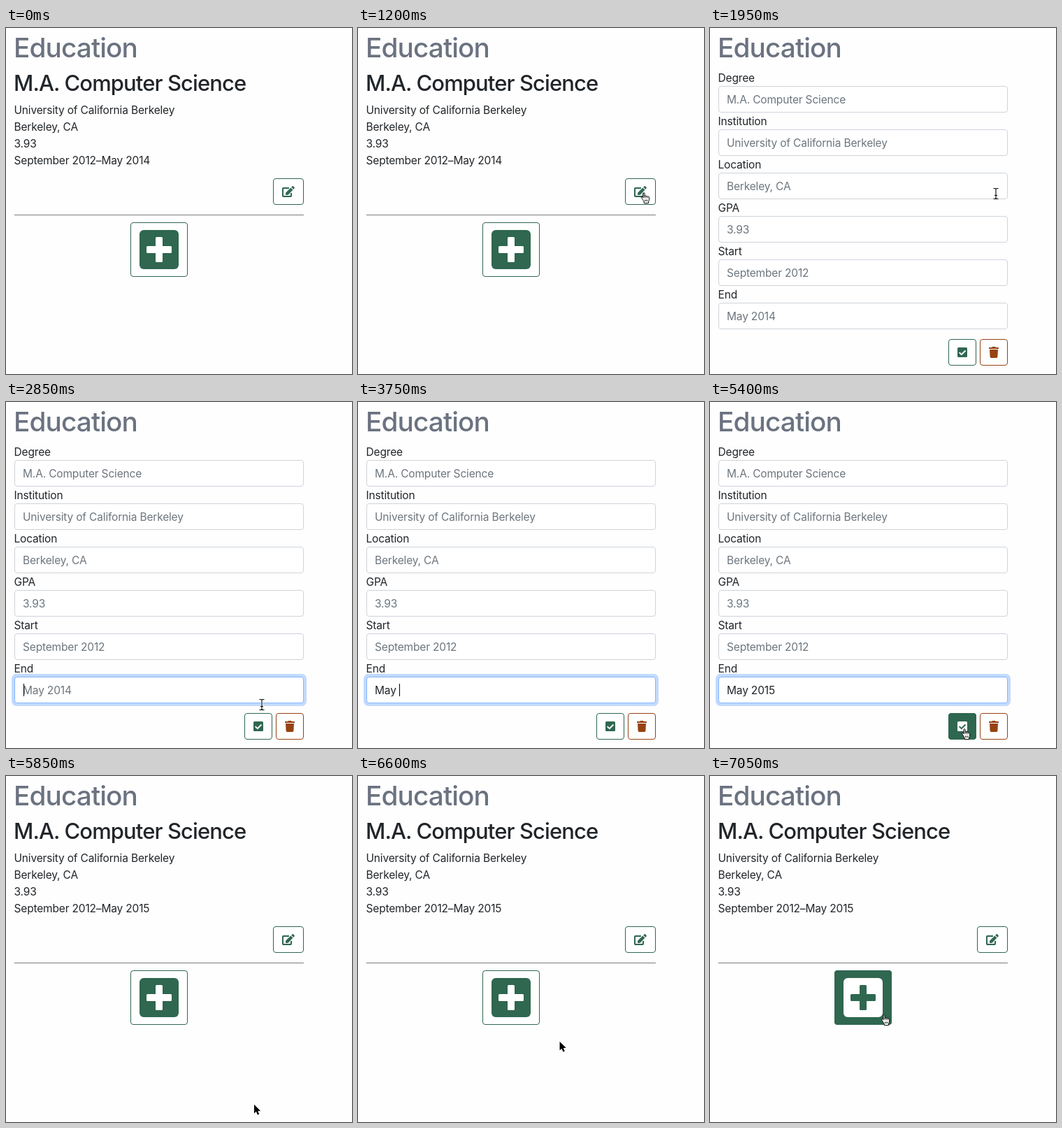
Animation of 495 by 495 pixels, one loop 8 s. Source, as an HTML page:

```html
<!DOCTYPE html>
<html lang="en">
<head>
<meta charset="utf-8">
<title>Education form</title>
<style>
html, body { margin: 0; width: 100%; height: 100%; overflow: hidden; background: #fefefe; }
svg { display: block; width: 495px; height: 495px; }
text { font: 400 15.5px Inter, "Open Sans", sans-serif; letter-spacing: -.17px; fill: #212529; font-optical-sizing: none; }
.h1 { font-size: 38.75px; font-weight: 500; letter-spacing: -.9px; fill: #6b7280; }
.h2 { font-size: 31px; font-weight: 500; letter-spacing: -.9px; }
.hint { fill: #6c757d; }
</style>
</head>
<body>
<svg id="stage" viewBox="0 0 495 495" xmlns="http://www.w3.org/2000/svg"></svg>
<script>
const LOOP = 8000, STEP = 150;
const GREEN = '#2f6750', BROWN = '#964312', WHITE = '#fff';

const label = (x, y, str, attrs = '') => `<text x="${x}" y="${y}" ${attrs}>${str}</text>`;
const box = (x, y, w, h, r, fill, stroke) =>
  `<rect x="${x + .5}" y="${y + .5}" width="${w - 1}" height="${h - 1}" rx="${r}" fill="${fill}" stroke="${stroke}"/>`;

// Each icon is drawn around its own top left corner.
const icons = {
  edit: fg => `<path d="M10 3H1.8Q1 3 1 3.8V14.2Q1 15 1.8 15H12.2Q13 15 13 14.2V10" fill="none" stroke="${fg}" stroke-width="2"/>
    <path d="M12.4 2.5 15.5 5.6 8.6 12.7 5.6 13Q5 13 5 12.4L5.3 9.4ZM13.2 1.7 14.4.4Q15.2-.2 16.1.4L17.6 1.9Q18.2 2.7 17.6 3.6L16.3 4.8Z" fill="${fg}"/>`,
  plus: (fg, bg) => `<rect width="56" height="56" rx="6" fill="${fg}"/>
    <rect x="10" y="23" width="36" height="10" rx="1.5" fill="${bg}"/>
    <rect x="23" y="10" width="10" height="36" rx="1.5" fill="${bg}"/>`,
  check: (fg, bg) => `<rect width="14" height="14" rx="1.5" fill="${fg}"/>
    <path d="M2.6 7.1 5.8 10.2 11.5 4.5" fill="none" stroke="${bg}" stroke-width="2"/>`,
  trash: fg => `<path d="M.5 1H4L4.7.3Q5 0 5.4 0H8.6Q9 0 9.3.3L10 1H13.5Q14 1 14 1.5V3H0V1.5Q0 1 .5 1ZM1 4H13L12.4 14.6Q12.3 16 10.9 16H3.1Q1.7 16 1.6 14.6Z" fill="${fg}"/>`
};

function button(name, x, y, w, h, iw, ih, color) {
  const at = `<g transform="translate(${x + (w - iw) / 2} ${y + (h - ih) / 2})">`;
  return box(x, y, w, h, 3.5, WHITE, color) + at + icons[name](color, WHITE) + '</g>' +
    `<g id="${name}Hot" opacity="0">` + box(x, y, w, h, 3.5, color, color) + at + icons[name](WHITE, color) + '</g></g>';
}

const fields = [
  ['Degree', 'M.A. Computer Science'],
  ['Institution', 'University of California Berkeley'],
  ['Location', 'Berkeley, CA'],
  ['GPA', '3.93'],
  ['Start', 'September 2012'],
  ['End', 'May 2014']
];

const form = fields.map(([name, hint], i) => {
  const y = 59 + 62 * i, last = i === fields.length - 1;
  const glow = `<g id="focus" opacity="0"><rect x="8" y="${y + 20}" width="422" height="46" rx="7" fill="#c2dafd"/>` +
    box(12, y + 24, 414, 38, 3.5, WHITE, '#86b7fe') + '</g>';
  return label(11.5, y + 18, name) + box(12, y + 24, 414, 38, 3.5, WHITE, '#ced4da') +
    (last ? glow : '') + label(24, y + 49, hint, `class="hint" ${last ? 'id="entry"' : ''}`);
}).join('');

const cursors = {
  arrow: `<path d="M0 0V12.7L2.9 10 4.9 14.8 7.2 13.8 5.2 9.2H9.2Z" fill="#000" stroke="#fff" stroke-width="1.6" paint-order="stroke"/>`,
  hand: `<g transform="translate(-4.3 -1)"><path d="M2.6 10.2 .9 8.1C0 6.9 1.3 5.9 2.3 6.8L3.3 7.8V1.7C3.3.3 5.4.3 5.4 1.7V5.7C5.6 4.6 7.5 4.7 7.6 5.9 7.9 5 9.6 5.2 9.7 6.4 10.1 5.7 11.9 5.9 11.9 7.4V10.2C11.9 12.4 10.7 13 10.7 15.7H4.7C4.6 13.2 3.4 11.9 2.6 10.2Z" fill="#fff" stroke="#000" stroke-linejoin="round"/>
    <path d="M5.4 5.5V8.3M7.6 6V8.3M9.7 6.5V8.3M5.8 10.5V13.2M7.6 10.5V13.2M9.4 10.5V13.2" stroke="#000" stroke-width=".8"/></g>`,
  beam: ['stroke="#fff" stroke-width="2.6"', 'stroke="#000" stroke-width="1.1"'].map(s =>
    `<path d="M-3.5-6.5H-1.5Q0-6.5 0-5V7Q0 8.5-1.5 8.5H-3.5M3.5-6.5H1.5Q0-6.5 0-5M0 7Q0 8.5 1.5 8.5H3.5M-2 3.5H2" fill="none" ${s}/>`).join('')
};

const stage = document.getElementById('stage');
stage.innerHTML = label(11, 42, 'Education', 'class="h1"') +
  '<g id="view">' + label(11, 90, 'M.A. Computer Science', 'class="h2"') +
  label(11.5, 123, 'University of California Berkeley') + label(11.5, 147, 'Berkeley, CA') +
  label(11.5, 171, '3.93') + label(11.5, 195, '', 'id="dates"') +
  button('edit', 382, 215, 44, 38, 18, 16, GREEN) +
  '<rect x="12" y="267" width="414" height="1" fill="#777b80"/>' +
  button('plus', 178, 278, 82, 78, 56, 56, GREEN) + '</g>' +
  '<g id="form">' + form + '<rect id="caret" y="403" width="1" height="18" fill="#000"/>' +
  button('check', 341, 445, 40, 38, 14, 14, GREEN) +
  button('trash', 386, 445, 40, 38, 14, 16, BROWN) + '</g>' +
  '<g id="pointer">' + Object.keys(cursors).map(k => `<g id="${k}">${cursors[k]}</g>`).join('') + '</g>';

const $ = id => document.getElementById(id);
const show = (id, on) => $(id).setAttribute('visibility', on ? 'visible' : 'hidden');
const fade = (id, t, start) => $(id).setAttribute('opacity', Math.max(0, Math.min(1, (t - start) / 300)));

// time, x, y, pointer shape
const path = [
  [0, 451, 255, ''],
  [600, 451, 255, 'arrow'],
  [1200, 409, 236, 'hand'],
  [1950, 409, 236, 'beam'],
  [2100, 409, 236, 'beam'],
  [2700, 372, 414, 'beam'],
  [3000, 364, 438, 'arrow'],
  [3300, 364, 438, ''],
  [5250, 363, 476, 'hand'],
  [5400, 364, 468, 'hand'],
  [5700, 364, 468, 'hand'],
  [5850, 355, 470, 'arrow'],
  [6300, 333, 421, 'arrow'],
  [6450, 333, 421, 'arrow'],
  [6900, 253, 347, 'hand'],
  [7050, 249, 342, 'hand'],
  [LOOP, 249, 342, 'hand']
];

const typing = [[3300, 'M'], [3750, 'May\u00a0'], [3900, 'May 2'], [4050, 'May 20'], [4350, 'May 201'], [4800, 'May 2015']];

function movePointer(t) {
  const i = path.findIndex(p => p[0] > t) - 1;
  const [t0, x0, y0, kind] = path[i], [t1, x1, y1] = path[i + 1];
  const k = (t - t0) / (t1 - t0), e = k * (2 - k);
  $('pointer').setAttribute('transform', `translate(${x0 + (x1 - x0) * e} ${y0 + (y1 - y0) * e})`);
  for (const name in cursors) $(name).setAttribute('display', name === kind ? 'inline' : 'none');
}

function draw(time) {
  const t = Math.floor(time % LOOP / STEP) * STEP;
  const editing = t >= 1950 && t < 5850;
  $('view').setAttribute('display', editing ? 'none' : 'inline');
  $('form').setAttribute('display', editing ? 'inline' : 'none');
  $('dates').textContent = 'September 2012–May ' + (t < 5850 ? 2014 : 2015);

  const typed = typing.filter(k => k[0] <= t).pop();
  const entry = $('entry');
  entry.textContent = typed ? typed[1] : 'May 2014';
  entry.style.fill = typed ? '#212529' : '';
  const caretOn = editing && t >= 2850 && t < 5250;
  show('caret', caretOn);
  if (caretOn) $('caret').setAttribute('x', Math.round(24 + (typed ? entry.getComputedTextLength() : 1)));

  fade('editHot', t < 1950 ? t : 0, 1200);
  fade('focus', t, 2550);
  fade('checkHot', t, 5100);
  fade('plusHot', t, 6750);
  movePointer(t);
}

const start = performance.now();
function tick() {
  draw(performance.now() - start);
  requestAnimationFrame(tick);
}
tick();
</script>
</body>
</html>
```
